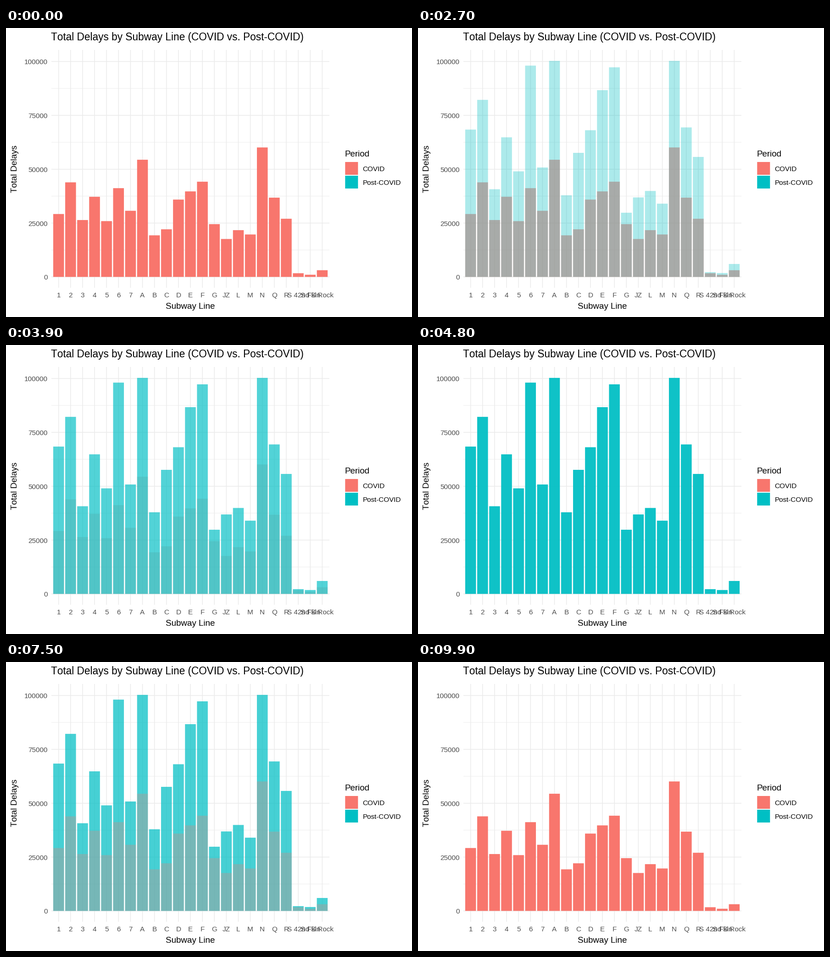
Animation of 885x632 px, one loop 10 s. Source, as a matplotlib script:

```python
import matplotlib.pyplot as plt
from matplotlib.animation import FuncAnimation
from matplotlib.patches import Rectangle

W, H, DPI = 885, 632, 100
FRAMES, INTERVAL = 100, 100
RED, TEAL, GRID, GRAY = "#F8766D", "#00BFC4", "#EBEBEB", "#4D4D4D"
LEFT, RIGHT, TOP, BOTTOM = 99, 705, 48, 568
ZERO, PX_PER_K = 544.3, 4.71
SMALL, MEDIUM, LARGE = 15.3, 18.8, 22.6

# Thousands of delays per line: COVID, post-COVID
DELAYS = {
    "1": (29.2, 68.4), "2": (43.9, 82.2), "3": (26.4, 40.7), "4": (37.2, 64.8),
    "5": (25.9, 49), "6": (41.2, 98.1), "7": (30.7, 50.8), "A": (54.4, 100.3),
    "B": (19.3, 37.9), "C": (22.1, 57.6), "D": (35.9, 68.1), "E": (39.7, 86.7),
    "F": (44.2, 97.3), "G": (24.5, 29.8), "JZ": (17.6, 36.9), "L": (21.7, 39.9),
    "M": (19.7, 34), "N": (60.1, 100.3), "Q": (36.8, 69.4), "R": (27, 55.7),
    "S 42nd": (1.7, 2.2), "S Fkln": (1, 1.8), "S Rock": (3.1, 6),
}
# Half a bar plus the margin stands at each end of the row
UNIT = (RIGHT - LEFT) / (len(DELAYS) + 0.2)

# The fades advance only at these steps
STEPS = [0, *range(19, 23, 3), *range(24, 49, 3), *range(69, 82, 2), *range(84, 100, 3)]
FADE_OUT, FULL, FADE_BACK = 16, 50, 66

plt.rcParams["text.kerning_factor"] = 6  # plain advances, no pair kerning

fig = plt.figure(figsize=(W / DPI, H / DPI), dpi=DPI, facecolor="white")
ax = fig.add_axes([0, 0, 1, 1])
ax.set_xlim(0, W)
ax.set_ylim(H, 0)
ax.axis("off")


def line_x(i):
    return LEFT + (i + 0.6) * UNIT


def value_y(k):
    return ZERO - k * PX_PER_K


def text(x, y, s, size, color="black", **kw):
    ax.text(x, y, s, fontsize=size * 72 / DPI, color=color, va="baseline",
            family="Liberation Sans", **kw)


def rule(xs, ys, width=1.5):
    ax.plot(xs, ys, color=GRID, lw=width * 72 / DPI, solid_capstyle="butt",
            zorder=1, snap=False)


def box(x, y, w, h, color):
    return ax.add_patch(Rectangle((x, y), w, h, fc=color, lw=0, snap=False))


def make_bars(column, color):
    bars = []
    for i, pair in enumerate(DELAYS.values()):
        height = pair[column] * PX_PER_K
        bars.append(box(line_x(i) - 0.45 * UNIT, ZERO - height, 0.9 * UNIT, height, color))
    return bars


def style(bars, alpha, z):
    for bar in bars:
        bar.set_alpha(alpha)
        bar.set_zorder(z)


def draw_chart():
    for k in range(0, 100, 25):
        rule([LEFT, RIGHT], [value_y(k + 12.5)] * 2, 0.9)
    for k in range(0, 101, 25):
        y = value_y(k)
        rule([LEFT, RIGHT], [y, y])
        text(90.5, y + 6, str(k * 1000), SMALL, GRAY, ha="right")
    for i, name in enumerate(DELAYS):
        x = line_x(i)
        rule([x, x], [TOP, BOTTOM])
        text(x, 589, name, SMALL, GRAY, ha="center")
    text(98.5, 27, "Total Delays by Subway Line (COVID vs. Post-COVID)", LARGE)
    text(402, 614, "Subway Line", MEDIUM, ha="center")
    text(24.3, 308.5, "Total Delays", MEDIUM, ha="center", rotation=90,
         rotation_mode="anchor")


def draw_legend():
    text(738, 281, "Period", MEDIUM)
    for y, color, name in ((293, RED, "COVID"), (323, TEAL, "Post-COVID")):
        box(739.3, y, 28, 28, color)
        text(777.5, y + 20, name, SMALL)


draw_chart()
draw_legend()
covid_bars = make_bars(0, RED)
post_bars = make_bars(1, TEAL)


def update(frame):
    step = max(s for s in STEPS if s <= frame)
    if step < FADE_BACK:
        post = max(0, step - FADE_OUT) / (FULL - FADE_OUT)
    else:
        post = 1 - (step - FADE_BACK) / (FRAMES - 1 - FADE_BACK)
    # The group fading in lies on top
    style(covid_bars, 1 - post, 4 if step > FADE_BACK else 2)
    style(post_bars, post, 3)
    return covid_bars + post_bars


anim = FuncAnimation(fig, update, frames=FRAMES, interval=INTERVAL,
                     repeat=True, repeat_delay=0, blit=False)
plt.show()
```
